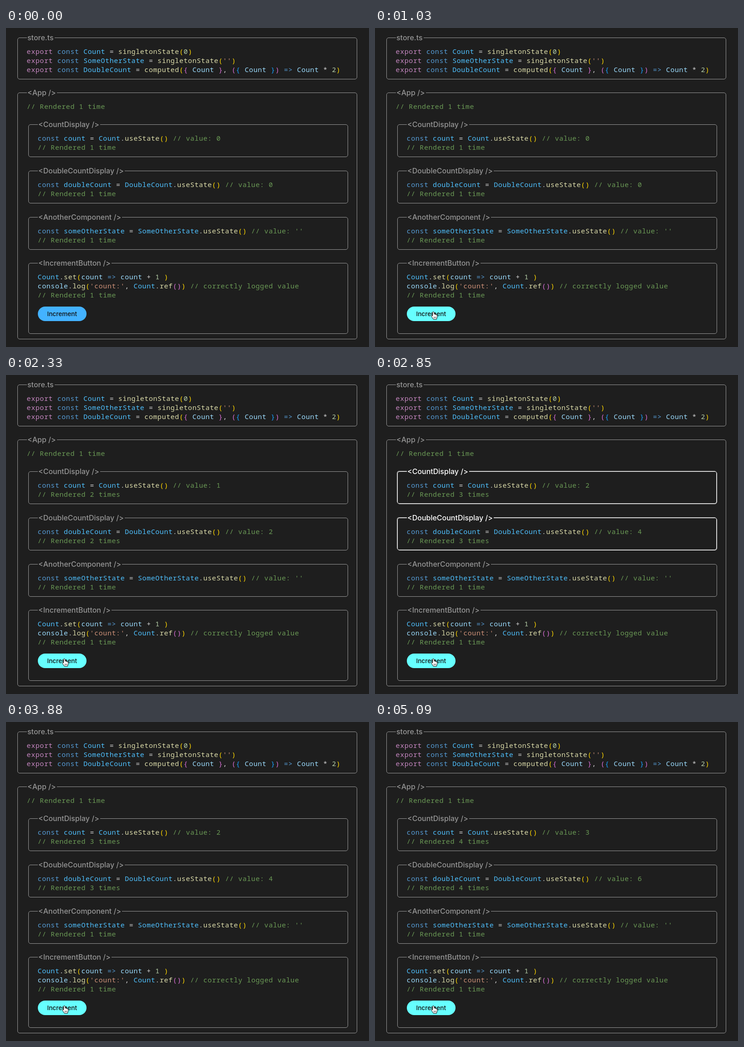
These frames come from a looping animation (798 px wide and 702 px high, 5.12 s). An HTML page:

```html
<!DOCTYPE html>
<html lang="en">
<head>
<meta charset="utf-8">
<title>Singleton state demo</title>
<style>
html, body { margin: 0; width: 100%; height: 100%; overflow: hidden; background: #1e1e1e; }
.box { position: absolute; box-sizing: border-box; border: 1px solid #999; border-radius: 5px; color: #959595; }
.box.lit { border-color: #fff; color: #fff; box-shadow: -1px -1px #fff9, inset -1px -1px #fff9; }
.label { position: absolute; left: 20px; top: -11px; padding: 0 2px 0 1px; background: #1e1e1e;
  font: 500 16px/20px Inter, sans-serif; white-space: pre; }
.code { position: absolute; left: 19.6px; top: 19px; margin: 0; color: #d4d4d4;
  font: 500 15px/20px "Noto Sans Mono", monospace; letter-spacing: .58px; }
.button { position: absolute; left: 70px; top: 613px; width: 106.5px; height: 32px; border-radius: 16px;
  background: #43b2ff; color: #111; text-align: center; font: 500 13.6px/32px Inter, sans-serif; }
.button.hover { background: #66ffff; }
#pointer { position: absolute; left: 0; top: 0; overflow: visible; stroke-linejoin: round; }
</style>
</head>
<body>
<script>
const LOOP = 5120, LIT = 500, CLICKS = [1450, 2550, 4100];
const PATH = [[60, 235, 716], [500, 134, 605], [640, 134, 605], [860, 128, 624]];

const COLORS = { keyword: '#c586c0', decl: '#569cd6', constant: '#4fc1ff', func: '#dcdcaa', name: '#9cdcfe',
  number: '#b5cea8', string: '#ce9178', comment: '#6a9955' };
const BRACKETS = ['#ffd700', '#da70d6', '#179fff'];

function highlight(line) {
  let depth = 0, previous = '';
  return line.replace(/\/\/.*|'[^']*'|=>|\w+|[(){}]/g, (token, at) => {
    const next = line[at + token.length];
    let color;
    if (token.startsWith('//')) color = COLORS.comment;
    else if (token[0] === "'") color = COLORS.string;
    else if (/[({]/.test(token)) color = BRACKETS[depth++];
    else if (/[)}]/.test(token)) color = BRACKETS[--depth];
    else if (token === 'export') color = COLORS.keyword;
    else if (token === 'const' || token === '=>') color = COLORS.decl;
    else if (/^\d/.test(token)) color = COLORS.number;
    else if (next === '(') color = COLORS.func;
    else if (previous === 'const' || (/^[A-Z]/.test(token) && next === '.')) color = COLORS.constant;
    else color = COLORS.name;
    previous = token;
    return `<span style="color:${color}">${token.replace('>', '&gt;')}</span>`;
  });
}

const rendered = n => `// Rendered ${n} time${n > 1 ? 's' : ''}`;

function addBox(label, x, y, w, h, source, live) {
  const box = document.createElement('div');
  box.className = 'box';
  box.style.cssText = `left:${x}px;top:${y}px;width:${w}px;height:${h}px`;
  box.innerHTML = '<span class="label"></span><pre class="code"></pre>';
  box.firstChild.textContent = label;
  document.body.append(box);
  const show = count => {
    box.lastChild.innerHTML = source(count).map(highlight).join('\n');
  };
  show(0);
  return { box, show, live };
}

const boxes = [
  addBox('store.ts', 25, 21, 747, 92, () => [
    'export const Count = singletonState(0)',
    "export const SomeOtherState = singletonState('')",
    'export const DoubleCount = computed({ Count }, ({ Count }) => Count * 2)']),
  addBox('<App />', 25, 142, 747, 543, () => [rendered(1)]),
  addBox('<CountDisplay />', 49, 212, 703, 72, n => [
    `const count = Count.useState() // value: ${n}`, rendered(n + 1)], true),
  addBox('<DoubleCountDisplay />', 49, 314, 703, 72, n => [
    `const doubleCount = DoubleCount.useState() // value: ${n * 2}`, rendered(n + 1)], true),
  addBox('<AnotherComponent />', 49, 416, 703, 72, () => [
    "const someOtherState = SomeOtherState.useState() // value: ''", rendered(1)]),
  addBox('<IncrementButton />', 49, 517, 703, 156, () => [
    'Count.set(count => count + 1 )',
    "console.log('count:', Count.ref()) // correctly logged value", rendered(1)])
].filter(b => b.live);

document.body.insertAdjacentHTML('beforeend', `
  <div class="button">Increment</div>
  <svg id="pointer" width="1" height="1">
    <path id="arrow" d="M0 0V14.5L3.3 11.4L5.6 16.8L8 15.8L5.7 10.5H10.2Z" fill="#000" stroke="#fff"/>
    <g id="hand" stroke="#000">
      <path d="M-1.6 1.4Q0-.9 1.6 1.4L2.3 6.3Q4-.1 4.7 6.8Q6.6 5.2 7.1 7.6Q9 6.8 9 9.4L8.5 13L7.3 17H.4L-2 13.4L-4.4 9.6Q-3.8 7.3-1.2 9.6Z" fill="#fff"/>
      <path d="M1.5 11.5V14.5M3.6 11.5V14.5M5.7 11.5V14.5" fill="none" stroke-width=".8"/>
    </g>
  </svg>`);
const button = document.querySelector('.button');
const [pointer, arrow, hand] = ['pointer', 'arrow', 'hand'].map(id => document.getElementById(id));

function pointerAt(t) {
  const i = PATH.findIndex(p => t < p[0]);
  if (i < 1) return PATH.at(i).slice(1);
  const [a, b] = [PATH[i - 1], PATH[i]];
  const k = (t - a[0]) / (b[0] - a[0]);
  const ease = k * k * (3 - 2 * k);
  return [a[1] + (b[1] - a[1]) * ease, a[2] + (b[2] - a[2]) * ease];
}

let shown = 0;
function draw(now) {
  const t = now % LOOP;
  const count = CLICKS.filter(c => t >= c).length;
  const lit = CLICKS.some(c => t >= c && t < c + LIT);
  for (const { box, show } of boxes) {
    if (count !== shown) show(count);
    box.classList.toggle('lit', lit);
  }
  shown = count;

  const [x, y] = pointerAt(t);
  const over = x >= 70 && x <= 177 && y >= 613 && y <= 645;
  pointer.style.transform = `translate(${x}px,${y}px)`;
  arrow.style.display = over ? 'none' : '';
  hand.style.display = over ? '' : 'none';
  button.classList.toggle('hover', over);
  requestAnimationFrame(draw);
}
draw(performance.now());
</script>
</body>
</html>
```
